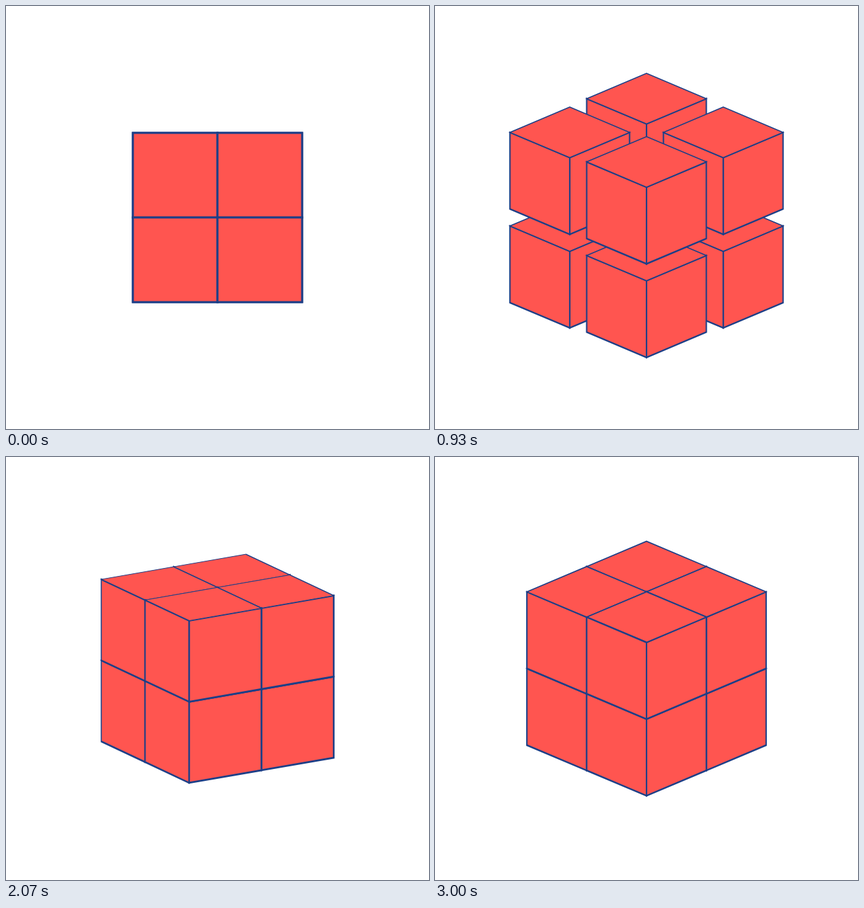
Animation of 640 by 640 pixels, one loop 3.57 s. Source, as an HTML page with a canvas:

```html
<!DOCTYPE html>
<html lang="en">
<head>
<meta charset="utf-8">
<title>Cube</title>
<style>
  html, body { margin: 0; width: 100%; height: 100%; overflow: hidden; background: #fff; }
  canvas { display: block; }
</style>
</head>
<body>
<canvas id="stage" width="640" height="640"></canvas>
<script>
const ctx = document.getElementById('stage').getContext('2d');
const LOOP = 3570, STEPS = 50;
const HALF = 64, CENTER = 320;
const FILL = '#ff5550', LINE = '#1d3f87';
const RAD = Math.PI / 180;

const clamp = x => Math.min(1, Math.max(0, x));

function smooth(x) {
  x = clamp(x);
  return x * x * (3 - 2 * x);
}

// cubic-bezier(1/3, 0, 0.4, 1)
function ease(x) {
  x = clamp(x);
  if (x === 0 || x === 1) return x;
  let lo = 0, hi = 1;
  for (let n = 0; n < 30; n++) {
    const t = (lo + hi) / 2, s = 1 - t;
    if (s * s * t + 1.2 * s * t * t + t * t * t < x) lo = t; else hi = t;
  }
  return lo * lo * (3 - 2 * lo);
}

function poseAt(step) {
  const intro = smooth((step - 2.1) / 9.88);
  const rest = 1 - intro;
  // A full quarter turn looks the same as none.
  const spin = ease((step - 22.38) / 10.32) % 1;
  const dip = Math.sin(Math.PI * spin) ** 1.41;
  return {
    yaw: (45 * intro + 90 * spin) * RAD,
    tilt: (25 * (1 - dip) + 22.5 * rest + 42.5 * rest ** 8) * RAD,
    spread: 51.2 * (ease((step - 9) / 10) - ease((step - 19.3) / 4.6)),
    twist: 90 * ease((step - 32.7) / 9.3) * RAD
  };
}

// Orthographic view: screen x, screen y, depth towards the viewer.
function project([a, y, b], { yaw, tilt }) {
  const near = a * Math.cos(yaw) - b * Math.sin(yaw);
  return [
    a * Math.sin(yaw) + b * Math.cos(yaw),
    near * Math.sin(tilt) - y * Math.cos(tilt),
    near * Math.cos(tilt) + y * Math.sin(tilt)
  ];
}

function drawFace(center, normal, u, v) {
  if (Math.abs(normal[2]) < 1e-3) return;
  const side = Math.sign(normal[2]) * HALF;
  ctx.setTransform(u[0], u[1], v[0], v[1],
    center[0] + normal[0] * side, center[1] + normal[1] * side);
  ctx.beginPath();
  ctx.rect(-HALF, -HALF, 2 * HALF, 2 * HALF);
  ctx.fill();
  ctx.stroke();
}

function makeCube(a, y, b, pose) {
  const angle = a > 0 ? pose.twist : 0;
  const cos = Math.cos(angle), sin = Math.sin(angle);
  const axes = [[1, 0, 0], [0, cos, -sin], [0, sin, cos]].map(d => project(d, pose));
  const [x0, y0, depth] = [0, 1, 2].map(i =>
    HALF * (a * axes[0][i] + y * axes[1][i] + b * axes[2][i]));
  const sideways = (a + b) / 2, forward = (a - b) / 2;
  const shift = -y / 2 + (forward > 0 ? 0.25 : 0.5) * forward;
  return {
    axes, depth, slab: a,
    center: [CENTER + x0 + pose.spread * sideways, CENTER + y0 + pose.spread * shift]
  };
}

function draw(step) {
  const pose = poseAt(step);
  ctx.setTransform(1, 0, 0, 1, 0, 0);
  ctx.fillStyle = '#fff';
  ctx.fillRect(0, 0, 640, 640);
  ctx.fillStyle = FILL;
  ctx.strokeStyle = LINE;
  ctx.lineWidth = 3;

  const cubes = [];
  for (const a of [-1, 1])
    for (const y of [-1, 1])
      for (const b of [-1, 1]) cubes.push(makeCube(a, y, b, pose));
  cubes.sort((p, q) => (pose.twist ? p.slab - q.slab : 0) || p.depth - q.depth);

  for (const { center, axes: [a, y, b] } of cubes) {
    drawFace(center, a, b, y);
    drawFace(center, b, a, y);
    drawFace(center, y, a, b);
  }
}

function tick() {
  const time = performance.now() % LOOP;
  draw(Math.floor((time + 5) * STEPS / LOOP) % STEPS);
  requestAnimationFrame(tick);
}
tick();
</script>
</body>
</html>
```
